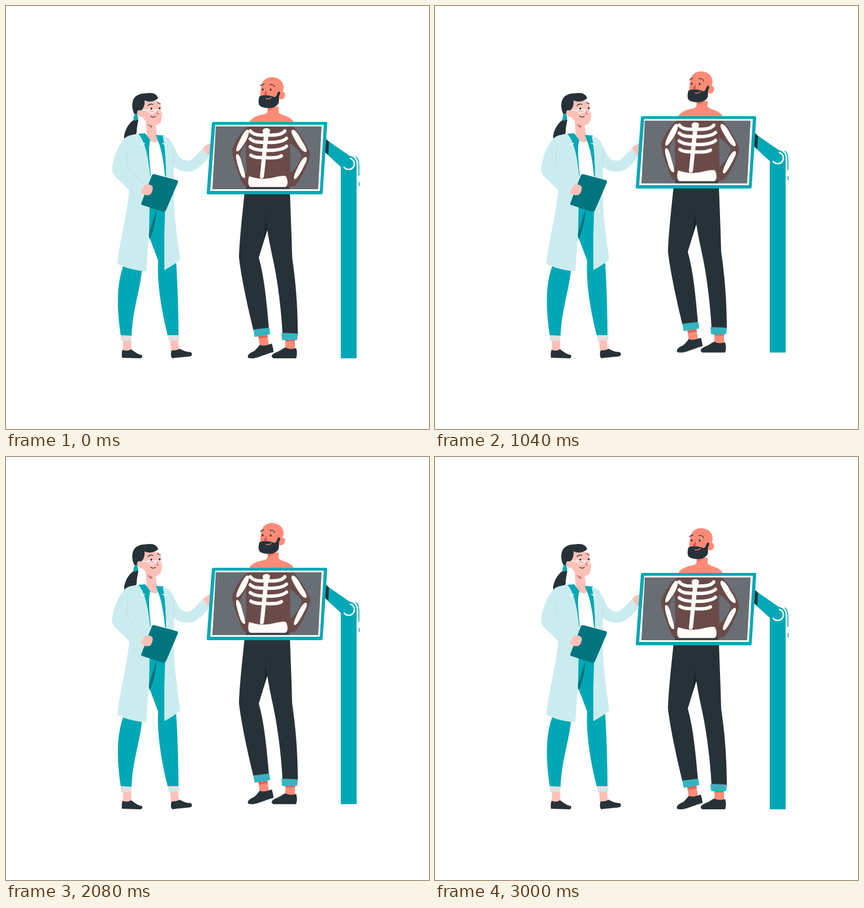
An HTML page without scripts for the animation above (3040 ms loop, 748x748 px).

```html
<!DOCTYPE html>
<html lang="en">
<head>
<meta charset="utf-8">
<title>X-ray check</title>
<style>
html, body { margin: 0; width: 100%; height: 100%; overflow: hidden; background: #fff; }
svg { display: block; width: 100vw; height: 100vh; }
.teal { fill: #00a8b5; }
.deep { fill: #00757f; }
.coat { fill: #cbecef; }
.dark { fill: #263238; }
.rose { fill: #ffc0b8; }
.skin { fill: #ff8b77; }
.cuff { fill: #35b4bf; }
.line { fill: none; stroke-linecap: round; stroke-linejoin: round; }
.ink { stroke: #263238; stroke-width: 1.3; }
.seam { stroke: #a8dbe0; stroke-width: .8; }
.bone { stroke: #fffdf8; stroke-width: 6; }
.lift { animation: lift 3040ms linear infinite; }
@keyframes lift {
  0%, 98.68% { transform: translateY(0); }
  49.6% { transform: translateY(-14.9px); }
}
</style>
</head>
<body>
<svg viewBox="0 0 748 748">
  <!-- doctor -->
  <g>
    <path class="rose" d="M346 254C352 247 357 243 363 243L362 262 353 267Z"/>
    <path class="dark" d="M229 200C219 204 211 217 209 229C208 235 212 238 213 242C222 238 230 231 231 223C231 215 233 208 234 201Z"/>
    <path class="rose" d="M207 590H221L222 611 207 612ZM290 590H304L306 611 292 612Z"/>
    <path class="dark" d="M206 608C204 614 205 619 205 622L237 623C241 623 242 619 240 617C232 616 226 610 221 607C217 610 211 610 206 608ZM293 609C291 614 291 620 294 623C305 621 318 621 327 619C330 617 329 613 326 612C320 612 312 609 307 606C302 609 297 609 293 609Z"/>
    <path class="teal" d="M252 340H283V452L301 455C303 485 305 540 305 583H286C274 535 267 490 269 450L252 405Z"/>
    <path class="teal" d="M208 458C196 490 195 530 203 583H222C224 535 237 505 241 462Z"/>
    <path class="deep" d="M266 360L252 405 254 413C261 398 265 380 266 360Z"/>
    <path fill="#e0e0e0" d="M203 582L222 583 221 592H203ZM286 582H306L307 591 288 592Z"/>
    <path class="coat" d="M297 246C303 268 314 276 325 273C336 267 341 256 349 252L359 267C348 281 336 293 322 293C311 293 303 290 296 284Z"/>
    <path fill="#fff" d="M246 235H278L284 310H252Z"/>
    <path class="rose" d="M246 190L267 200 265 213 267 228C272 240 266 243 259 240L249 231Z"/>
    <path class="teal" d="M234 226L246 225 258 241 255 238C251 250 254 275 256 300L250 305ZM265 228L279 229 285 306 281 300C279 275 274 250 269 239Z"/>
    <path class="coat" d="M234 226C248 241 252 275 255 300L253 400 248 469C229 468 211 463 197 456C200 420 214 370 218 326L200 308C190 300 186 292 188 284C191 264 199 244 212 232C218 228 227 227 234 226Z"/>
    <path class="coat" d="M277 230C287 231 293 238 296 247L297 310C295 365 304 415 308 449C299 455 290 462 280 467L280 405 283 310C283 275 282 250 277 230Z"/>
    <path class="line" stroke="#fff" stroke-width="1.6" d="M239 245L245 243M277 243L283 245"/>
    <path class="line seam" d="M216 250C216 262 209 273 216 284L243 314M218 326L238 334M297 248L296 284"/>
    <path class="deep" d="M263 297.500L302 308Q305 309 304 312L283 361Q281 365 277 363.500L241 352Q238 351 239.500 348L258 299Q260 296.500 263 297.500Z"/>
    <path class="coat" d="M218 299L246 317 238 335 217 325Z"/>
    <path class="rose" d="M245 317C250 315 254 315 258 318C261 321 259 327 257 331C254 335 249 335 246 334C242 333 239 331 238 329Z"/>
    <path fill="#b97f7b" d="M250 208C252 212 255 215 258 216L259 212C256 211 253 210 250 208Z"/>
    <path class="rose" d="M237 168H269C276 175 277 190 275 201C273 208 269 211 264 210C254 210 246 204 241 196C236 198 231 192 232 187C233 183 237 184 239 186Z"/>
    <path class="dark" d="M225 166C228 158 238 154 247 154.500C258 152 267 155 269 163C262 170 252 170 245 167C246 176 242 184 238 185C234 183 231 186 232 191L227 191C223 184 222 174 225 166Z"/>
    <path class="teal" d="M227 192L232 190 234 199 229 203 225 201Z"/>
    <path class="line" stroke="#fff" stroke-width="1.3" d="M242 184L251 185M251 183C251 192 263 191 265 184M265 185C266 190 274 190 276 183M251 183L265 184 276 183"/>
    <path class="line ink" d="M251 176C254 173 257 173 260 174M268 171L273 173M256 195C259 197 262 197 264 195"/>
    <ellipse class="dark" cx="257" cy="181.500" rx="1.500" ry="2"/>
    <ellipse class="dark" cx="271.500" cy="181" rx="1.500" ry="2"/>
    <path fill="#f28f8a" d="M267 183L271 191C270 193 268 193 266 192Z"/>
  </g>

  <g class="lift">
    <!-- patient -->
    <path class="skin" d="M430 206C434 196 448 193 458 191C462 190 463 187 463 178H482V188C486 194 504 194 509 206Z"/>
    <path fill="#e96f60" d="M463 181C470 181 475 177 479 173C476 180 470 184 463 185Z"/>
    <path class="skin" d="M450 166C449 154 450 145 453 137C456 128 466 125 473 126C484 127 491 135 491 145L489 152C494 151 495 158 492 162C490 165 486 166 483 164L477 176Z"/>
    <path class="dark" d="M448 160C455 156 468 158 474 161C479 161 479 155 481 152C484 150 486 153 484 157C481 161 484 166 482 172C477 181 464 182 454 179C445 177 446 169 448 160Z"/>
    <path class="line" stroke="#ff8b77" stroke-width="1.300" d="M460 164C464 165 467 164 469 162"/>
    <path class="line ink" d="M450 141C452 139 454 138 456 138M467 139C471 138 474 140 475 143"/>
    <ellipse class="dark" cx="454" cy="147.500" rx="1.500" ry="2.100"/>
    <ellipse class="dark" cx="468" cy="148" rx="1.500" ry="2.100"/>
    <path fill="#e8504f" d="M461 148L456 156C457 159 460 158 461 157Z"/>
    <path class="skin" d="M446 582L462 580 465 601 449 603ZM494 588H511V608H494Z"/>
    <path fill="#d96555" d="M446 584L462 582 463 586 447 588ZM494 590H511V593H494Z"/>
    <path class="dark" d="M428 622C426 616 433 613 439 610C444 606 446 602 449 599C455 602 461 600 470 597C472 603 473 608 473 612C464 614 455 618 446 621C440 623 433 624 428 622ZM470 621C469 616 474 614 479 612C486 609 490 605 494 604C500 607 506 607 513 605C515 611 515 617 513 623H473Z"/>
    <path class="dark" d="M422 328H502L505 410 506 445C512 485 516 530 516 580H489C487 540 481 490 473 452C470 438 466 420 462 396L447 445C457 480 461 525 465 571L438 575C428 535 416 480 412 445C413 410 419 360 422 328Z"/>
    <path fill="#1a2429" d="M457 360C457 373 461 386 462 396L455 418C459 398 459 378 457 360Z"/>
    <path class="cuff" d="M438 574Q437 572 439 572L464 569Q466 569 466 571L467 579Q467 581 465 581L441 585Q439 585 439 583ZM487 579Q487 577 489 578L514 579Q516 579 516 581L515 589Q515 591 513 591L490 591Q488 591 488 589Z"/>

    <!-- stand -->
    <path class="teal" d="M566 236L615 270 598 290 563 258Z"/>
    <path class="dark" d="M566 235L571 240 570 263 563 257Z"/>
    <path class="teal" d="M592 282H620V623H592Z"/>
    <circle class="teal" cx="606" cy="279" r="14"/>
    <path class="line" stroke="#fff" stroke-width="2.600" d="M609 269.500A10 10 0 1 1 598 285"/>
    <path class="line" stroke="#00a8b5" stroke-width="1.600" d="M619 267C623 270 624 276 624 283V300M624.500 312V318"/>

    <!-- screen -->
    <path class="teal" d="M367 205H566Q568.500 205 568 208L560 330Q560 333 557 333H357Q354.500 333 355 330L364 208Q364 205 367 205Z"/>
    <path fill="#fff" d="M370 210H562L555 327H361Z"/>
    <path fill="#686e74" d="M371 213H558L552 324H365Z"/>
    <path fill="#6a4b49" fill-rule="evenodd" d="M428 213H507C516 220 533 246 538 262C536 276 524 303 512 317L500 321H430C420 319 416 313 413 300C408 286 400 268 400 254C405 240 416 221 428 213ZM424 242C419 250 415 258 414 264L422 300 425 293ZM502 243L503 294C512 288 521 275 523 263C519 257 509 246 502 243Z"/>
    <path fill="#3e4449" d="M425 318H500L501 324H424Z"/>
    <path fill="#fffdf8" d="M430 301C438 303 449 307 461 305C475 304 488 298 495 301C499 308 499 318 494 320H432C427 318 428 305 430 301Z"/>
    <path fill="#fffdf8" d="M454 219C457 215 464 215 467 219C467 223 465 226 464 230L456 302C455 306 449 306 449 302L456 230C456 226 453 223 454 219Z"/>
    <path class="line bone" stroke-width="5" d="M432 221C437 228 447 229 458 228M432 235C438 241 447 241 458 241M432 249C438 254 446 255 456 255M433 264C439 268 446 268 455 268M462 228C473 229 488 228 493 221M462 241C474 242 490 240 496 234M460 255C473 256 490 254 496 248M458 268C469 269 481 269 487 265"/>
    <path fill="#fffdf8" d="M428 219C432 221 428 231 424 239C418 249 411 259 408 257C405 254 411 242 415 234C420 225 424 217 428 219ZM408 262C412 260 416 271 418 281C421 291 425 303 422 304C418 306 413 294 411 285C408 276 405 264 408 262ZM506 219C511 217 518 228 523 238C528 246 534 255 531 258C526 260 518 249 513 240C508 231 502 222 506 219ZM531 267C535 270 528 281 524 289C519 298 513 308 510 306C507 304 512 293 516 285C520 276 527 265 531 267Z"/>
  </g>
</svg>
</body>
</html>
```
